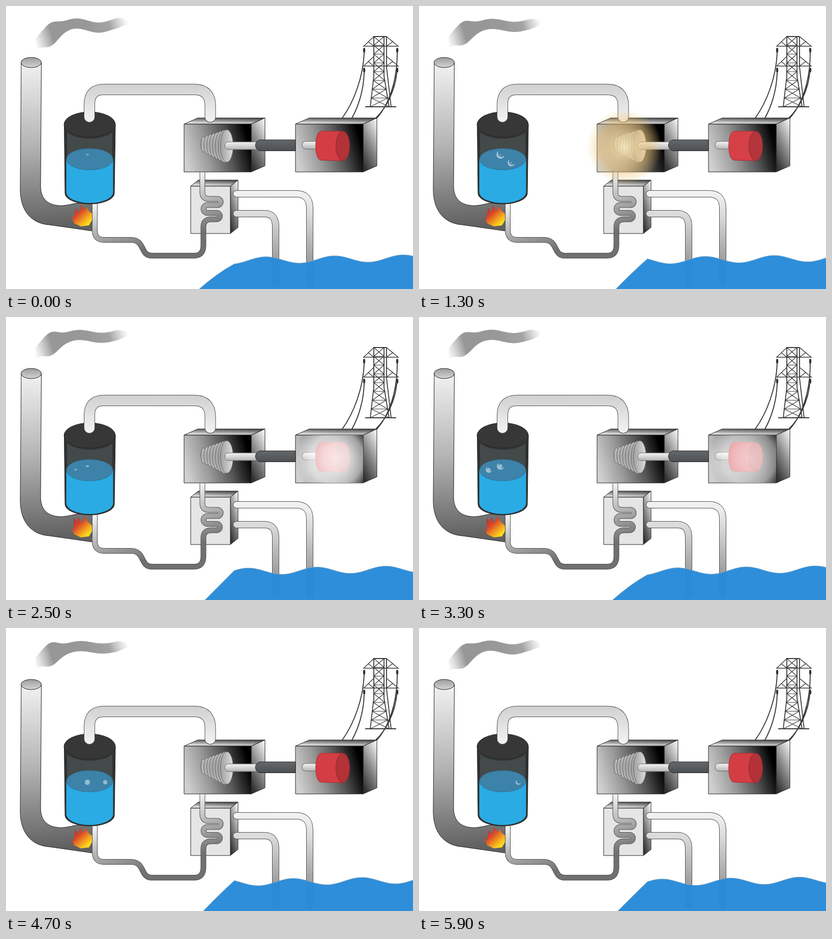
An HTML page that plays this animation: 800 px wide and 556 px high, repeating every 6 s.

```html
<!DOCTYPE html>
<html lang="en">
<head>
<meta charset="utf-8">
<title>Thermal power station</title>
<style>
html, body { margin: 0; width: 100%; height: 100%; overflow: hidden; background: #fff; }
svg { display: block; width: 800px; height: 556px; }
.line { fill: none; stroke: #3a3a3a; }
.edge { stroke: #222; stroke-width: 1; stroke-linejoin: round; }
.soft { stroke: #666; stroke-width: 1; }
</style>
</head>
<body>
<svg viewBox="0 0 800 556">
  <defs id="defs">
    <clipPath id="genFace"><path d="M569 232H702V326H569Z"/></clipPath>
  </defs>

  <path id="smoke" fill="url(#smokeFill)"/>

  <path class="edge" fill="url(#stackFill)" d="M30 111L28 360C28 406 53 428 86 430L170 442V384L135 388C122 391 111 393 103 392C80 390 68 377 68 353L69.500 111Z"/>
  <ellipse class="edge" cx="49.500" cy="111" rx="20" ry="10" fill="url(#rimFill)"/>
  <path id="flame" fill="url(#flameFill)"/>

  <g id="tower"></g>
  <g id="boxes"></g>
  <g id="pipes"></g>

  <g id="boiler">
    <path class="edge" fill="#303232" d="M114.500 233L116 368A48.500 21 0 0 0 213 368L215 233Z"/>
    <path fill="#434a49" d="M120 240H209V305H120Z"/>
    <path fill="#2aabe4" d="M118.500 301V366A46 21 0 0 0 210.500 366V301Z"/>
    <ellipse cx="164.500" cy="301" rx="45.500" ry="21" fill="#3d82a9" stroke="#337095"/>
    <path fill="#363737" d="M114.500 233V238A50.300 24 0 0 0 215 238V233Z"/>
    <ellipse class="edge" cx="164.500" cy="233" rx="50.500" ry="25" fill="#373737"/>
  </g>
  <g id="bubbles" fill="#a9c8da"></g>
  <g id="steam"></g>

  <g id="turbine" class="soft"></g>
  <rect class="soft" x="430" y="267" width="72" height="15" rx="7" fill="url(#shaftFill)"/>
  <path class="edge" fill="url(#couplingFill)" d="M569 263H499A11 11 0 0 0 499 284.500H569Z"/>
  <path class="soft" fill="url(#shaftFill)" d="M614 266H589A7 7.500 0 0 0 589 281H614Z"/>
  <path fill="#d43d43" stroke="#a82c32" d="M662 246H620C605 246 605 304 620 303L662 304Z"/>
  <ellipse cx="662" cy="275" rx="13.500" ry="29" fill="#b23238" stroke="#8f262b"/>

  <circle id="warmGlow" cx="404" cy="277" r="74" fill="url(#warm)"/>
  <g clip-path="url(#genFace)"><circle id="whiteGlow" cx="650" cy="277" r="78" fill="url(#white)"/></g>

  <path id="sea" fill="#288bd9" fill-opacity=".97" stroke="#6f9fc4"/>
</svg>
<script>
const LOOP = 6000, STEP = 100, TAU = Math.PI * 2;
const $ = id => document.getElementById(id);

function add(parent, tag, attrs) {
  const el = document.createElementNS('http://www.w3.org/2000/svg', tag);
  for (const k in attrs) el.setAttribute(k, attrs[k]);
  return parent.appendChild(el);
}

// Colours are spread evenly; "#rgb@.5" adds an opacity.
function gradient(id, colours, axis) {
  const grad = add($('defs'), axis ? 'linearGradient' : 'radialGradient', { id });
  if (axis) {
    const [x1, y1, x2, y2] = axis;
    for (const [k, v] of Object.entries({ x1, y1, x2, y2 })) grad.setAttribute(k, v);
    if (Math.max(...axis) > 1) grad.setAttribute('gradientUnits', 'userSpaceOnUse');
  }
  const list = colours.split(' ');
  list.forEach((c, i) => {
    const [colour, alpha = 1] = c.split('@');
    add(grad, 'stop', { offset: i / (list.length - 1), 'stop-color': colour, 'stop-opacity': alpha });
  });
}

gradient('smokeFill', '#aaa@0 #979797 #979797 #999 #999@.9 #aaa@0', [60, 86, 240, 30]);
gradient('stackFill', '#f2f2f2 #b4b4b4 #606060', [50, 110, 75, 435]);
gradient('rimFill', '#9c9c9c #d4d4d4', [0, 0, 0, 1]);
gradient('steamFill', '#d0d0d0 #f4f4f4', [0, 153, 0, 230]);
gradient('returnFill', '#f2f2f2 #707070', [386, 327, 418, 434]);
gradient('coolFill', '#f4f4f4 #dadada #b8b8b8 #999', [0, 362, 0, 510]);
gradient('frontFill', '#cfcfcf #999 #555 #000', [0, .6, .97, .4]);
gradient('topFill', '#f0f0f0 #4a4a4a', [.35, 1, .65, 0]);
gradient('sideFill', '#f0f0f0 #8c8c8c #333', [.8, 0, .3, 1]);
gradient('discFill', '#a0a0a0 #dedede', [0, 0, 1, 0]);
gradient('shaftFill', '#f4f4f4 #b4b4b4', [0, 0, 0, 1]);
gradient('couplingFill', '#64686a #4c5052', [0, 0, 0, 1]);
gradient('flameFill', '#c22c28 #dc4a28 #f09a20 #ffe21c', [.2, .15, .85, .85]);
gradient('warm', '#fff0c4@.85 #f3d28c@.66 #eebd66@.45 #f0c060@0');
gradient('white', '#fff@.88 #fff@.8 #fff@.62 #fff@0');

function pipe(layer, d, width, fill, cap = 'round') {
  const base = { d, fill: 'none', 'stroke-linecap': cap };
  add($(layer), 'path', { ...base, stroke: '#505050', 'stroke-width': width + 1 });
  add($(layer), 'path', { ...base, stroke: `url(#${fill})`, 'stroke-width': width - 1 });
}

function box(x, y, w, h, dx, front) {
  const dy = 12, face = (d, fill) => add($('boxes'), 'path', { class: 'edge', d, fill });
  face(`M${x} ${y}l${dx} ${-dy}h${w}l${-dx} ${dy}Z`, 'url(#topFill)');
  face(`M${x + w} ${y}l${dx} ${-dy}v${h}l${-dx} ${dy}Z`, 'url(#sideFill)');
  face(`M${x} ${y}h${w}v${h}h${-w}Z`, front);
}

function buildTower() {
  const line = (d, width = 1.4) => add($('tower'), 'path', { class: 'line', d, 'stroke-width': width });
  line('M722 60H748M706 198H767', 2);
  line('M723 60V138L716 198M743 60V138L753 198M748 60V120L757 198', 1.8);
  for (const y of [79, 118]) {
    const top = y - 19, mid = y - 9;
    line(`M723 ${top}L703 ${y}H771L748 ${top}M712 ${mid}L723 ${y}M760 ${mid}L748 ${y}`);
    for (const x of [704, 769]) add($('tower'), 'ellipse', { cx: x, cy: y + 8, rx: 2.2, ry: 5, fill: '#333' });
  }
  const rows = 8, rowY = i => 60 + 138 * i / rows;
  const spread = y => Math.max(0, y - 138) / 60;
  for (let i = 0; i < rows; i++) {
    const a = rowY(i), b = rowY(i + 1), l = y => 723 - 7 * spread(y), r = y => 743 + 10 * spread(y);
    line(`M${l(a)} ${a}L${r(b)} ${b}H${l(b)}L${r(a)} ${a}`, 1.2);
  }
  line('M704 92C702 140 684 188 661 220M704 131C703 165 693 197 680 220M769 92C769 145 754 192 729 220M768 131C765 165 748 200 727 220', 1.9);
}

function buildTurbine() {
  const discs = 6;
  for (let i = 0; i <= discs; i++) {
    const k = i / discs;
    add($('turbine'), 'ellipse', { cx: 388 + 42 * k, cy: 272 + 3.5 * k, rx: 5 + 8 * k, ry: 15 + 17 * k, fill: 'url(#discFill)' });
  }
  add($('turbine'), 'ellipse', { cx: 434, cy: 275, rx: 12.5, ry: 32, fill: 'url(#discFill)' });
}

buildTower();
box(350, 232, 132, 94, 27, 'url(#frontFill)');
box(569, 232, 133, 94, 27, 'url(#frontFill)');
box(363, 354, 78, 93, 15, '#e5e5e5');
pipe('pipes', 'M386 327V366Q386 379 399 379H416A6 6 0 0 1 416 391H396A7.700 7.700 0 0 0 396 406.500H415A6.300 6.300 0 0 1 415 419H404Q388 419 388 434V470Q388 490.500 370 490.500H286C264 490.500 273 459.500 246 459.500H192Q174.500 459.500 174.500 440V385', 10, 'returnFill', 'butt');
pipe('pipes', 'M453 369H570Q597 369 597 397V545', 13, 'coolFill');
pipe('pipes', 'M453 408H508Q530 408 530 433V545', 13, 'coolFill');
pipe('steam', 'M164 218V193Q164 164 192 164H370Q401.500 164 401.500 196V218', 21, 'steamFill');
buildTurbine();

const clamp = v => Math.min(1, Math.max(0, v));
const smooth = v => v * v * (3 - 2 * v);
const ease = (t, from, to) => smooth(clamp((t - from) / (to - from)));
const sway = (t, period) => (1 - Math.cos(TAU * t / period)) / 2;
const pathOf = pts => 'M' + pts.map(p => p.map(v => v.toFixed(2))).join('L') + 'Z';

// A rippling ribbon that climbs steeply on the left and narrows to a tip.
function smoke(t) {
  const k = sway(t, 1880), upper = [], lower = [];
  for (let x = 58; x <= 240; x += 2) {
    const ripple = (5 - 2 * k) * Math.sin(TAU * (x - 159 - 8 * k) / 96);
    const mid = 37 + (38 - 5 * k) * Math.exp((60 - x) / 28) + ripple;
    const half = (10 + 13 * Math.exp(-(((x - 88) / 20) ** 2))) * Math.sqrt(clamp((240 - x) / 20));
    upper.push([x, mid - half]);
    lower.unshift([x, mid + half]);
  }
  return pathOf([...upper, ...lower]);
}

// Five tongues in an arch; they lean and change height in turn.
function flame(t) {
  const k = sway(t, LOOP), tips = 5, pts = [[134, 427]];
  for (let i = 0; i < tips; i++) {
    const u = i / (tips - 1), arch = Math.sin(Math.PI * u);
    const x = 127 + 42 * u - 6 * k * arch;
    const y = 411 - 19 * arch - 4 * u + 3 * k * (i % 2 ? -1 : 1);
    pts.push([x, y]);
    if (i < tips - 1) pts.push([x + 6, y + 6 + 6 * arch]);
  }
  return pathOf([...pts, [170, 419], [163, 431], [147, 433]]);
}

// Three bursts, each a middle bubble and a partner at some offset.
const LIFE = 1800, POP = 820;
const bubbles = [
  { start: 0, y: 292, dx: 21, dy: 16 },
  { start: 2430, y: 293, dx: -23, dy: 7 },
  { start: 4100, y: 303, dx: 35, dy: 0 }
].flatMap(({ start, y, dx, dy }, i) => [
  bubble(160, y, 8 - i, start),
  bubble(160 + dx, y + dy, 7 - i, start + 50)
]);

function bubble(x, y, r, start) {
  const rim = `M${x - r * .4} ${y - r * .9}A${r} ${r} 0 1 0 ${x + r} ${y + r * .2}A${r * .85} ${r * .85} 0 1 1 ${x - r * .4} ${y - r * .9}Z`;
  return {
    r, start,
    ball: add($('bubbles'), 'ellipse', { cx: x, cy: y }),
    rim: add($('bubbles'), 'path', { d: rim })
  };
}

function drawBubble({ r, start, ball, rim }, t) {
  const age = t - start, live = age >= 0 && age < LIFE, popped = age >= POP;
  ball.setAttribute('opacity', live ? .8 : 0);
  rim.setAttribute('opacity', live && popped ? .9 : 0);
  if (!live) return;
  const rx = popped ? r * .6 * ((LIFE - age) / (LIFE - POP)) ** 2 : 3 + (r - 3) * age / POP;
  ball.setAttribute('rx', rx);
  ball.setAttribute('ry', rx * clamp(.4 + age / 500));
}

function sea(t) {
  const phase = t / 3360, crest = 510 + 135 * phase;
  const level = x => 498.5 - .014 * (x - 580) - 6.7 * Math.cos(TAU * (x - crest) / 135);
  const lean = Math.cos(TAU * phase - 3.84), foot = 385 + 8 * lean, top = level(449);
  let d = `M${foot} 557Q${(foot + 449) / 2 + 1} ${(557 + top) / 2 - 4 + 4 * lean} 449 ${top}`;
  for (let x = 453; x <= 805; x += 4) d += `L${x} ${level(x).toFixed(2)}`;
  return d + 'V560H375Z';
}

function draw(t) {
  $('smoke').setAttribute('d', smoke(t));
  $('flame').setAttribute('d', flame(t));
  $('warmGlow').setAttribute('opacity', ease(t, 100, 700) - ease(t, 1750, 2400));
  $('whiteGlow').setAttribute('opacity', ease(t, 1200, 2300) - ease(t, 2950, 4300));
  bubbles.forEach(b => drawBubble(b, t));
  $('sea').setAttribute('d', sea(t));
}

const begin = performance.now();
function tick() {
  const t = (performance.now() - begin) % LOOP;
  draw(Math.floor(t / STEP) * STEP);
  requestAnimationFrame(tick);
}
tick();
</script>
</body>
</html>
```
